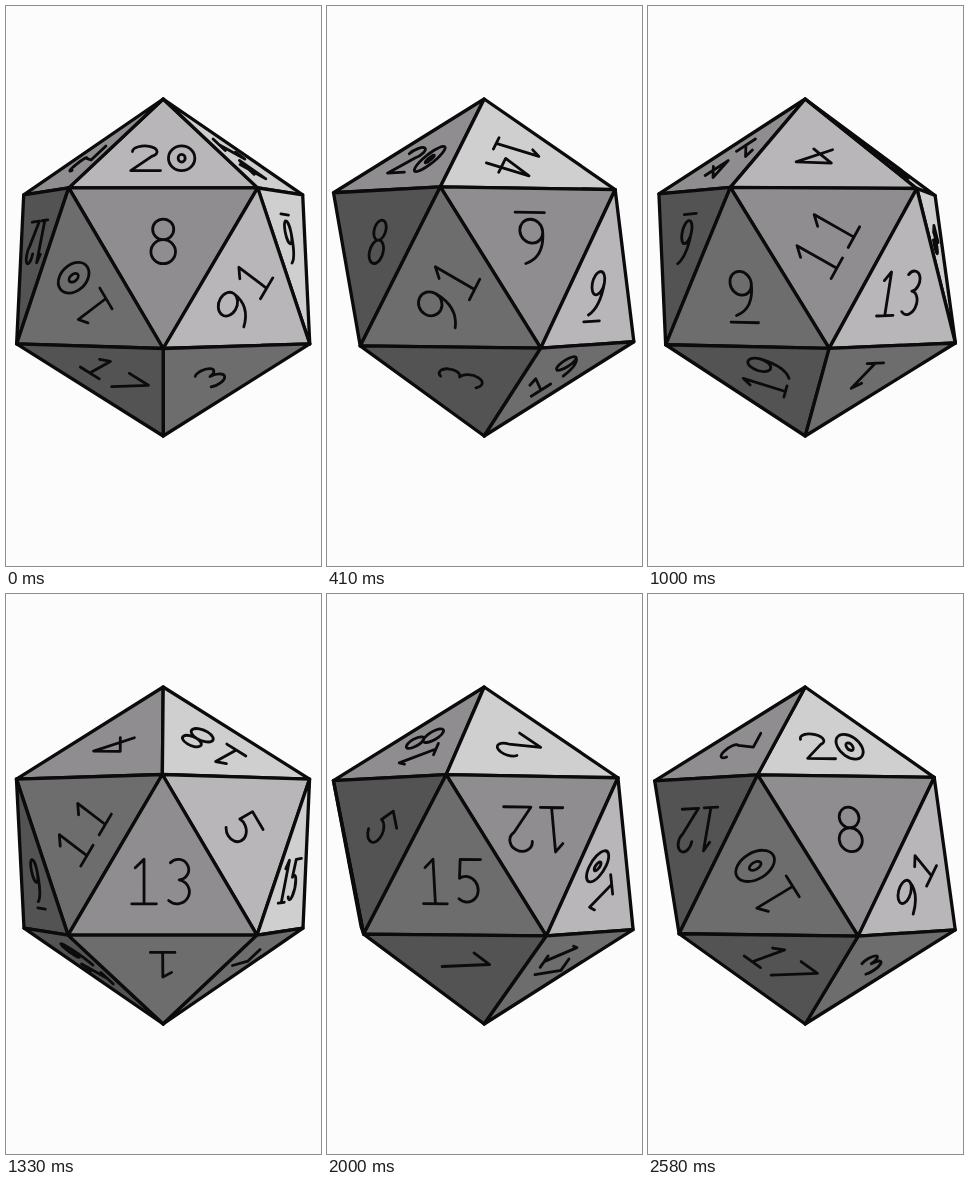
Animation of 315 by 560 pixels, one loop 2.66 s. Source, as an HTML page:

```html
<!DOCTYPE html>
<html lang="en">
<head>
<meta charset="utf-8">
<title>Rolling d20</title>
<style>
html, body { margin: 0; height: 100%; overflow: hidden; background: #fcfcfc; }
svg { display: block; width: 100vw; height: 100vh; }
path { stroke: #0b0b0b; stroke-linecap: round; stroke-linejoin: round; }
.face { stroke-width: 3.3; }
.mark { fill: none; stroke-width: 2.8; vector-effect: non-scaling-stroke; }
</style>
</head>
<body>
<svg id="stage" viewBox="0 0 315 560"></svg>
<script>
const LOOP = 2660, FPS = 12;
const CX = 157.2, CY = 261.5, RADIUS = 150.3, RISE = 74.5, TIP = 168.5, DEPTH = 0.08;

// Hand-turned: [step, degrees]
const TURN = [[0, 0], [3, 25.5], [8, 90.8], [16, 180.3], [21, 235], [27, 296], [31, 341], [32, 360]];

const TONES = ['#535353', '#6d6d6d', '#8f8d8f', '#b8b6b8', '#cfcfcf'];

// Digits / rotation, and the tones (mid, low, high) of each band of faces
const BANDS = {
  top: { labels: '20/0 14/120 4/240 18/240 2/240', tone: [3, 2, 4], lag: 0 },
  down: { labels: '8/0 6_/180 11/300 5/60 12/180', tone: [2, 0, 4], lag: 13 },
  up: { labels: '91/300 9_/0 13/0 15/0 10/240', tone: [2, 0, 4], lag: 13 },
  base: { labels: '3/300 19/300 1/180 7/60 17/60', tone: [1, 0, 1], lag: 13 }
};

const oval = (y, rx, ry) =>
  `M0 ${y - ry}a${rx} ${ry} 0 1 0 0 ${2 * ry}a${rx} ${ry} 0 1 0 0 ${-2 * ry}Z`;

// Pen strokes, box about -7..7 by -13..13
const PEN = {
  0: oval(0, 7.5, 13) + oval(0, 2, 4),
  1: 'M-5-8L0-13V13M-7 13H7',
  2: 'M-7-7A7 6 0 1 1 4-2L-8 13H9',
  3: 'M-6-11A6 6 0 1 1-1-1A7 7 0 1 1-7 11',
  4: 'M3 13V-13L-8 4H9',
  5: 'M7-13H-5L-6-2A7 7.5 0 1 1-7 10',
  6: oval(6, 7, 7) + 'M-7 6Q-7-9 5-13',
  7: 'M-7-13H7L-5 13',
  8: oval(-7, 6, 6) + oval(6, 7, 7),
  9: oval(-6, 7, 7) + 'M7-6Q7 9-5 13',
  _: 'M-9 17H9'
};

const stage = document.getElementById('stage');

function add(tag, parent, attrs) {
  const el = document.createElementNS('http://www.w3.org/2000/svg', tag);
  for (const key in attrs) el.setAttribute(key, attrs[key]);
  return parent.appendChild(el);
}

function buildFace(band, i, label) {
  const [text, rot] = label.split('/');
  const group = add('g', stage);
  const shape = add('path', group, { class: 'face' });
  const marks = add('g', group);
  const hand = add('g', marks, { transform: `rotate(${rot}) scale(0.93)` });
  const digits = text.replace('_', '');
  [...text].forEach((ch, k) => {
    const x = ch === '_' ? 0 : (k - (digits.length - 1) / 2) * 21;
    add('path', hand, { class: 'mark', d: PEN[ch], transform: `translate(${x} 0)` });
  });
  return { band, i, group, shape, marks };
}

const faces = Object.keys(BANDS).flatMap(band =>
  BANDS[band].labels.split(' ').map((label, i) => buildFace(band, i, label)));

function turnAt(step) {
  const k = TURN.findIndex(([s]) => s > step);
  const [s0, a0] = TURN[k - 1], [s1, a1] = TURN[k];
  return a0 + (a1 - a0) * (step - s0) / (s1 - s0);
}

// A vertex of the upper (-1) or lower (1) ring in perspective
function ring(deg, side) {
  const a = deg * Math.PI / 180;
  const zoom = 1 / (1 - DEPTH * Math.cos(a));
  return [CX + RADIUS * Math.sin(a) * zoom, CY + side * RISE * zoom];
}

function corners({ band, i }, turn) {
  const hi = k => ring(k * 72 - 36 - turn, -1);
  const lo = k => ring(k * 72 - turn, 1);
  switch (band) {
    case 'top': return [hi(i), hi(i + 1), [CX, CY - TIP]];
    case 'down': return [hi(i), hi(i + 1), lo(i)];
    case 'up': return [lo(i), lo(i + 1), hi(i + 1)];
    default: return [lo(i), lo(i + 1), [CX, CY + TIP]];
  }
}

// Light falls from the right and moves one tone per 36 degrees
function toneOf({ band, i }, turn) {
  const { tone: [mid, low, high], lag } = BANDS[band];
  const centre = i * 72 + (band === 'up' || band === 'base' ? 36 : 0);
  const angle = (centre - turn + 900) % 360 - 180;
  const level = mid + Math.round((angle - lag) / 36);
  return TONES[Math.max(low, Math.min(high, level))];
}

function drawFace(f, turn) {
  const pts = corners(f, turn);
  const [a, b, c] = pts;
  const tall = f.band === 'top' || f.band === 'up' ? -87 : 87;
  const ux = (b[0] - a[0]) / 100, uy = (b[1] - a[1]) / 100;
  const vx = (c[0] - (a[0] + b[0]) / 2) / tall, vy = (c[1] - (a[1] + b[1]) / 2) / tall;
  const seen = ux * vy - uy * vx > 0.01;

  f.group.style.display = seen ? '' : 'none';
  if (!seen) return;

  const ox = (a[0] + b[0] + c[0]) / 3, oy = (a[1] + b[1] + c[1]) / 3;
  f.shape.setAttribute('d', `M${pts.join('L')}Z`);
  f.shape.setAttribute('fill', toneOf(f, turn));
  f.marks.setAttribute('transform', `matrix(${[ux, uy, vx, vy, ox, oy]})`);
}

// Steps begin on whole hundredths of a second
function stepAt(ms) {
  const ticks = Math.floor((ms % LOOP) / 10) + 1;
  return Math.ceil(ticks * FPS / 100) - 1;
}

let shown = -1;
function draw() {
  const step = stepAt(performance.now());
  if (step !== shown) {
    shown = step;
    const turn = turnAt(step);
    for (const f of faces) drawFace(f, turn);
  }
  requestAnimationFrame(draw);
}
draw();
</script>
</body>
</html>
```
